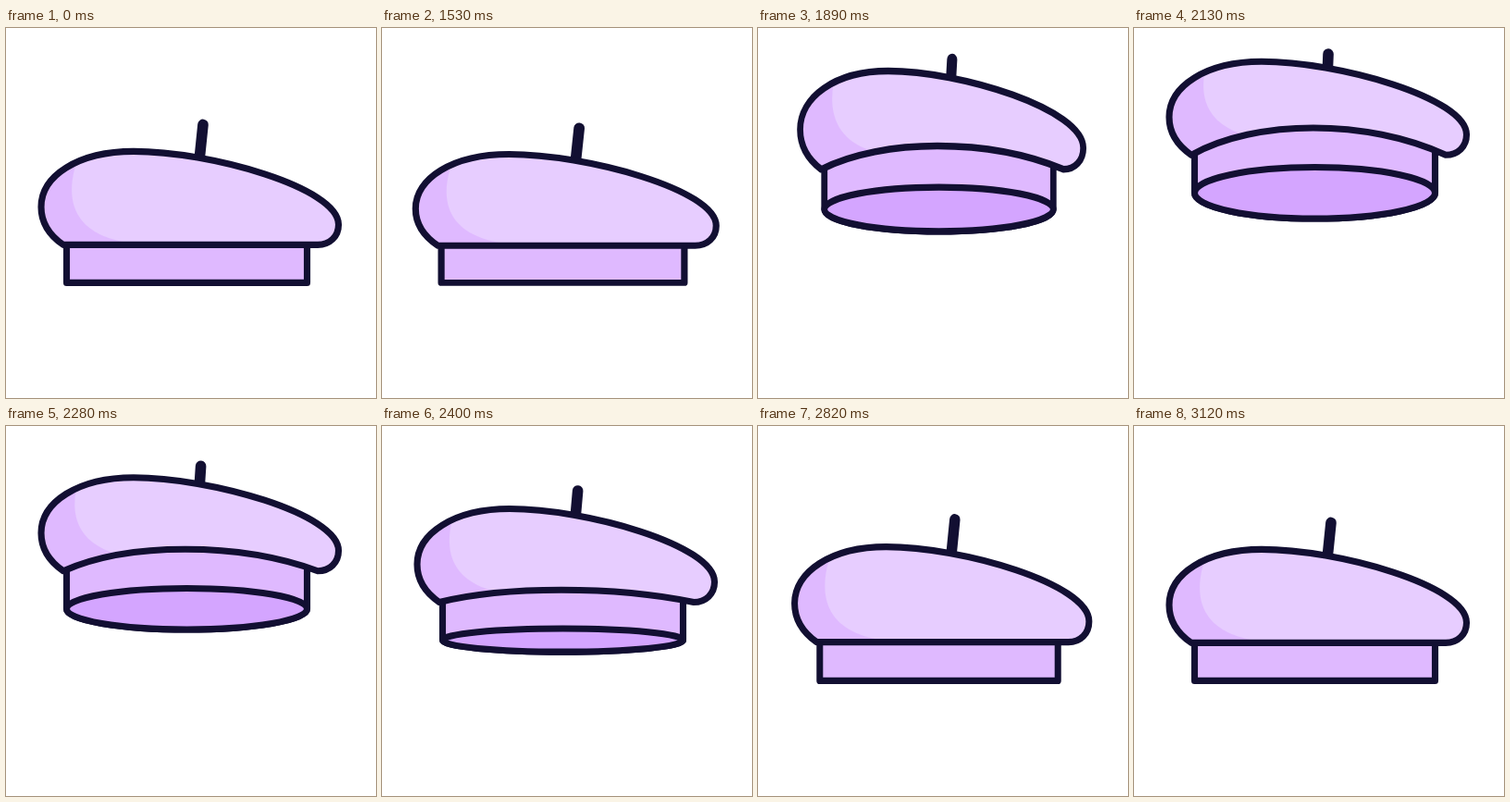
An HTML page with a canvas for the animation above (3.15 s loop, 400 px wide and 400 px high).

```html
<!DOCTYPE html>
<html lang="en">
<head>
<meta charset="utf-8">
<title>Hopping beret</title>
<style>
  html, body { margin: 0; height: 100%; overflow: hidden; background: #fff; }
  canvas { display: block; width: 400px; height: 400px; }
</style>
</head>
<body>
<canvas id="stage" width="400" height="400"></canvas>
<script>
const ctx = document.getElementById('stage').getContext('2d');
const LOOP = 3150, STEP = 30;
const INK = '#120f32', LIGHT = '#e7cdff', MID = '#dfb9ff', DARK = '#d4a5ff';
const LINE = 7.1, STEM = 11.6;
const PIVOT = { x: 196, y: 275 }, GROUND = 275.4;
const JUMP = { start: 1631, apex: 2090, land: 2507, height: 98 };

// time, horizontal scale, vertical scale
const SCALE = [
  [0, 1, 1], [1500, 1, 1], [1600, 1.05, 0.9], [1860, 0.95, 1.055], [2100, 1, 1],
  [2460, 1, 1], [2610, 1.05, 0.9], [2800, 0.99, 1.02], [3120, 1, 1], [LOOP, 1, 1]
];

const smooth = u => u * u * (3 - 2 * u);

function scaleAt(t) {
  const i = SCALE.findIndex(key => key[0] > t);
  const [a, b] = [SCALE[i - 1], SCALE[i]];
  const u = smooth((t - a[0]) / (b[0] - a[0]));
  return [1, 2].map(k => a[k] + (b[k] - a[k]) * u);
}

// 0 on the ground, 1 at the top of the jump
function liftAt(t) {
  const { start, apex, land } = JUMP;
  const u = (t - apex) / (t < apex ? apex - start : land - apex);
  return Math.max(0, 1 - u * u);
}

function paint(path, fill) {
  ctx.lineWidth = LINE;
  ctx.fillStyle = fill;
  ctx.fill(path);
  ctx.stroke(path);
}

function drawStem(lift) {
  ctx.lineWidth = STEM;
  ctx.stroke(new Path2D(`M${213 - 3 * lift} ${104 + 21 * lift} L209.5 138`));
}

function drawBand(lift) {
  const ry = 28 * lift;
  const band = new Path2D('M65.5 200 V275');
  band.ellipse(195.5, 275, 130, ry, 0, Math.PI, 0, true);
  band.lineTo(325.5, 200);
  paint(band, MID);
  if (ry > 0) {
    const opening = new Path2D();
    opening.ellipse(195.5, 275, 130, ry, 0, 0, Math.PI * 2);
    paint(opening, DARK);
  }
}

function drawDome(lift) {
  const brim = 234 - 39.5 * lift;
  const dome = new Path2D(`M62 234 C46 223 38 209 38 193 C38 160 77 133 138 133
    C220 133 359.5 172 359.5 212 C359.5 225 350 234 337 234
    C252 ${brim} 132 ${brim} 62 234 Z`);
  ctx.fillStyle = MID;
  ctx.fill(dome);
  ctx.save();
  ctx.clip(dome);
  ctx.translate(4 * lift, -16 * lift);
  ctx.fillStyle = LIGHT;
  ctx.fill(new Path2D('M78 140 C66 172 60 226 145 233 L200 270 H400 V100 H90 Z'));
  ctx.restore();
  ctx.lineWidth = LINE;
  ctx.stroke(dome);
}

function frame() {
  const t = Math.floor(performance.now() % LOOP / STEP) * STEP;
  const lift = liftAt(t);
  ctx.fillStyle = '#fff';
  ctx.fillRect(0, 0, 400, 400);
  ctx.save();
  ctx.translate(PIVOT.x, GROUND - JUMP.height * lift);
  ctx.scale(...scaleAt(t));
  ctx.translate(-PIVOT.x, -PIVOT.y);
  ctx.strokeStyle = INK;
  ctx.lineCap = ctx.lineJoin = 'round';
  drawStem(lift);
  drawBand(lift);
  drawDome(lift);
  ctx.restore();
  requestAnimationFrame(frame);
}
frame();
</script>
</body>
</html>
```
